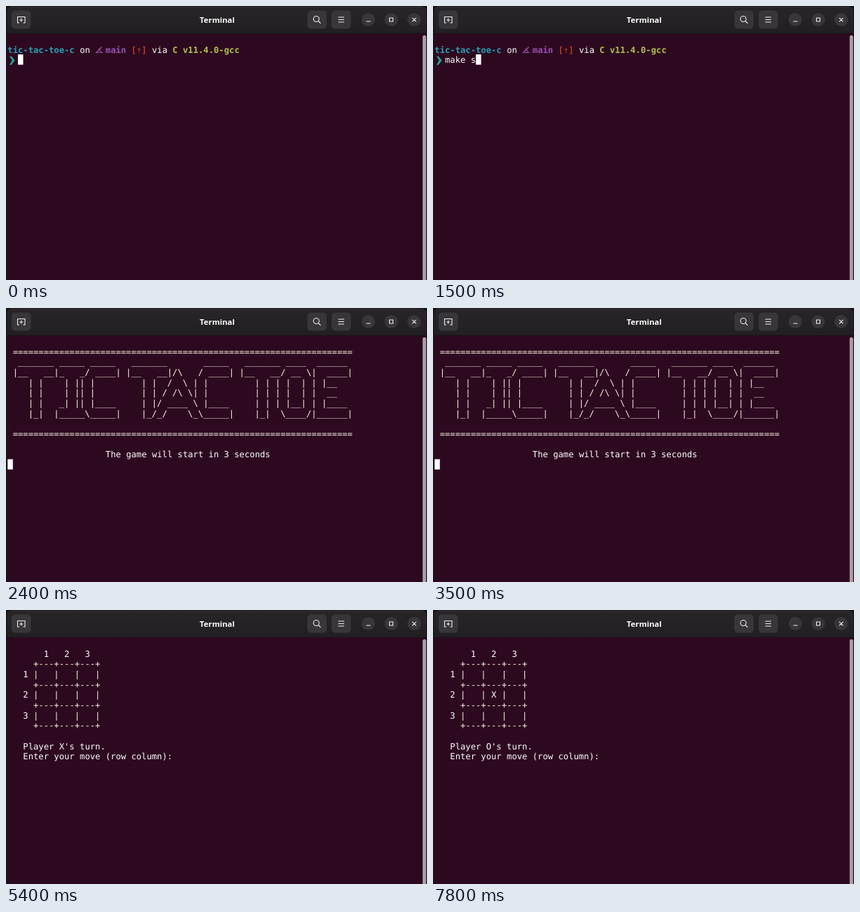
An HTML page for the animation above (8000 ms loop, 600x391 px).

```html
<!DOCTYPE html>
<html lang="en">
<head>
<meta charset="utf-8">
<title>Terminal</title>
<style>
  html, body { margin: 0; width: 100%; height: 100%; overflow: hidden; background: #151315; }
  svg { display: block; width: 600px; height: 391px; }
  .term text { font: 12.2px "DejaVu Sans Mono", monospace; white-space: pre; text-rendering: geometricPrecision; fill: #fff; }
  .term .art { fill: #faf4e2; }
  .term .b { font-weight: 700; }
  .title { font: 700 11.3px "Open Sans", "Noto Sans", sans-serif; fill: #fff; text-anchor: middle; }
  .icon { fill: none; stroke: #f2f0f2; stroke-width: 1.1; }
</style>
</head>
<body>
<svg viewBox="0 0 600 391">
  <defs>
    <linearGradient id="bar" x2="0" y2="1">
      <stop offset="0" stop-color="#272527"/>
      <stop offset="1" stop-color="#211f21"/>
    </linearGradient>
  </defs>
  <rect width="600" height="391" fill="#151315"/>
  <rect x="1.5" y="36" width="597.5" height="355" fill="#2d0920"/>
  <path d="M1.5 39V8q0-7 7-7H592q7 0 7 7V39z" fill="url(#bar)"/>
  <path d="M6 1.3H594" stroke="#3a383a" stroke-width=".8"/>
  <path d="M1.5 39H599" stroke="#191419"/>
  <text class="title" x="301" y="24">Terminal</text>
  <g fill="#383638">
    <rect x="8" y="6.5" width="27.5" height="26" rx="5"/>
    <rect x="429.5" y="6.5" width="27.5" height="26" rx="5"/>
    <rect x="464" y="6.5" width="27.5" height="26" rx="5"/>
    <circle cx="516.3" cy="19.5" r="9.6"/>
    <circle cx="549" cy="19.5" r="9.6"/>
    <circle cx="581.7" cy="19.5" r="9.6"/>
  </g>
  <g class="icon">
    <path d="M18.5 24H16.5V15.5H27V24H25M16.5 24H19M24.500 24H27M21.750 17.500V22.500M19.250 20H24.250"/>
    <circle cx="442.200" cy="18.500" r="4"/>
    <path d="M445.200 21.500L448.500 24.800M473.500 16H482M473.500 19.500H482M473.500 23H482"/>
    <path d="M513.500 22H519.500M546.500 17H551.500V22H546.500zM579 16.800L584.500 22.300M584.500 16.800L579 22.300"/>
  </g>
  <path d="M593.800 391V44.200a2.500 2.500 0 0 1 5 0V391z" fill="#aa9fa6"/>
  <g class="term">
    <g id="prompt">
      <g fill="none" stroke="#9a50b4" stroke-width="1.2">
        <path d="M136.500 58.500L128.500 66.500H138M132 60.500L135.500 66"/>
      </g>
      <path d="M5 71.800H7.800L12.600 77.500L7.800 84H5L8.800 77.500z" fill="#26a394"/>
    </g>
    <g id="banner"></g>
    <g id="board"></g>
    <rect id="cursor" width="7.500" height="14.700" fill="#fff"/>
  </g>
</svg>
<script>
const NS = "http://www.w3.org/2000/svg";
const LOOP = 8000, CELL = 7.345, LINE = 14.67, LEFT = 2.3, TOP = 40;
const $ = id => document.getElementById(id);
const colX = c => LEFT + c * CELL;
const rowY = r => TOP + r * LINE;

function put(group, row, col, str, cls = "", fill = "") {
  const t = document.createElementNS(NS, "text");
  t.setAttribute("x", colX(col));
  t.setAttribute("y", rowY(row) + 12);
  t.setAttribute("class", cls);
  if (fill) t.style.fill = fill;
  t.textContent = str;
  return $(group).appendChild(t);
}

// Shell prompt
put("prompt", 1, 0, "tic-tac-toe-c", "b", "#2a9fb4");
put("prompt", 1, 14, "on");
put("prompt", 1, 19, "main", "b", "#9a50b4");
put("prompt", 1, 24, "[⇡]", "b", "#bd3b22");
put("prompt", 1, 28, "via");
put("prompt", 1, 32, "C v11.4.0-gcc", "b", "#b0c24a");
const command = put("prompt", 2, 2, "");

// Title banner
const rule = "=".repeat(66);
[
  rule,
  String.raw` _______ _____ _____   _______       _____   _______ ____  ______`,
  String.raw`|__   __|_   _/ ____| |__   __|/\   / ____| |__   __/ __ \|  ____|`,
  String.raw`   | |    | || |         | |  /  \ | |         | | | |  | | |__`,
  String.raw`   | |    | || |         | | / /\ \| |         | | | |  | |  __`,
  String.raw`   | |   _| || |____     | |/ ____ \ |____     | | | |__| | |____`,
  String.raw`   |_|  |_____\_____|    |_/_/    \_\_____|    |_|  \____/|______|`,
  "",
  rule
].forEach((s, i) => put("banner", i + 1, 1, s, "art"));
put("banner", 11, 19, "The game will start in 3 seconds");

// Game board
put("board", 1, 7, "1   2   3");
for (let i = 0; i < 4; i++) put("board", 2 + 2 * i, 5, "+---+---+---+", "art");
for (let i = 0; i < 3; i++) {
  put("board", 3 + 2 * i, 3, String(i + 1));
  put("board", 3 + 2 * i, 5, "|   |   |   |", "art");
}
const mark = put("board", 5, 11, "X");
const turn = put("board", 10, 3, "");
put("board", 11, 3, "Enter your move (row column):");
const move = put("board", 11, 33, "");

const typed = (str, times, t) => str.slice(0, times.filter(k => t >= k).length);
const show = (el, on) => el.setAttribute("visibility", on ? "inherit" : "hidden");
const blink = (t, start) => Math.floor((t - start) / 600) % 2 === 0;

const COMMAND_KEYS = [300, 400, 500, 700, 900, 1500, 1600, 1700, 1800, 2100];
const MOVE_KEYS = [6100, 6600, 6800];
const START = 2400, PLAY = 5400, PLACED = 7300;

function draw(t) {
  const cmd = typed("make start", COMMAND_KEYS, t);
  const placed = t >= PLACED;
  const input = placed ? "" : typed("2 2", MOVE_KEYS, t);
  const inPrompt = t < START, inGame = t >= PLAY;

  show($("prompt"), inPrompt);
  show($("banner"), !inPrompt && !inGame);
  show($("board"), inGame);
  show(mark, inGame && placed);
  command.textContent = cmd;
  move.textContent = input;
  turn.textContent = `Player ${placed ? "O" : "X"}'s turn.`;

  let row = 2, col = 2 + cmd.length, lit = true;
  if (inGame) {
    row = 11;
    col = 33 + input.length;
    lit = t >= 5900 && t < 7800;
  } else if (!inPrompt) {
    row = 12;
    col = 0;
    lit = blink(t, 2300);
  }
  $("cursor").setAttribute("x", colX(col));
  $("cursor").setAttribute("y", rowY(row) - 0.3);
  show($("cursor"), lit);
}

const begin = performance.now();
function tick() {
  draw((performance.now() - begin) % LOOP);
  requestAnimationFrame(tick);
}
tick();
</script>
</body>
</html>
```
